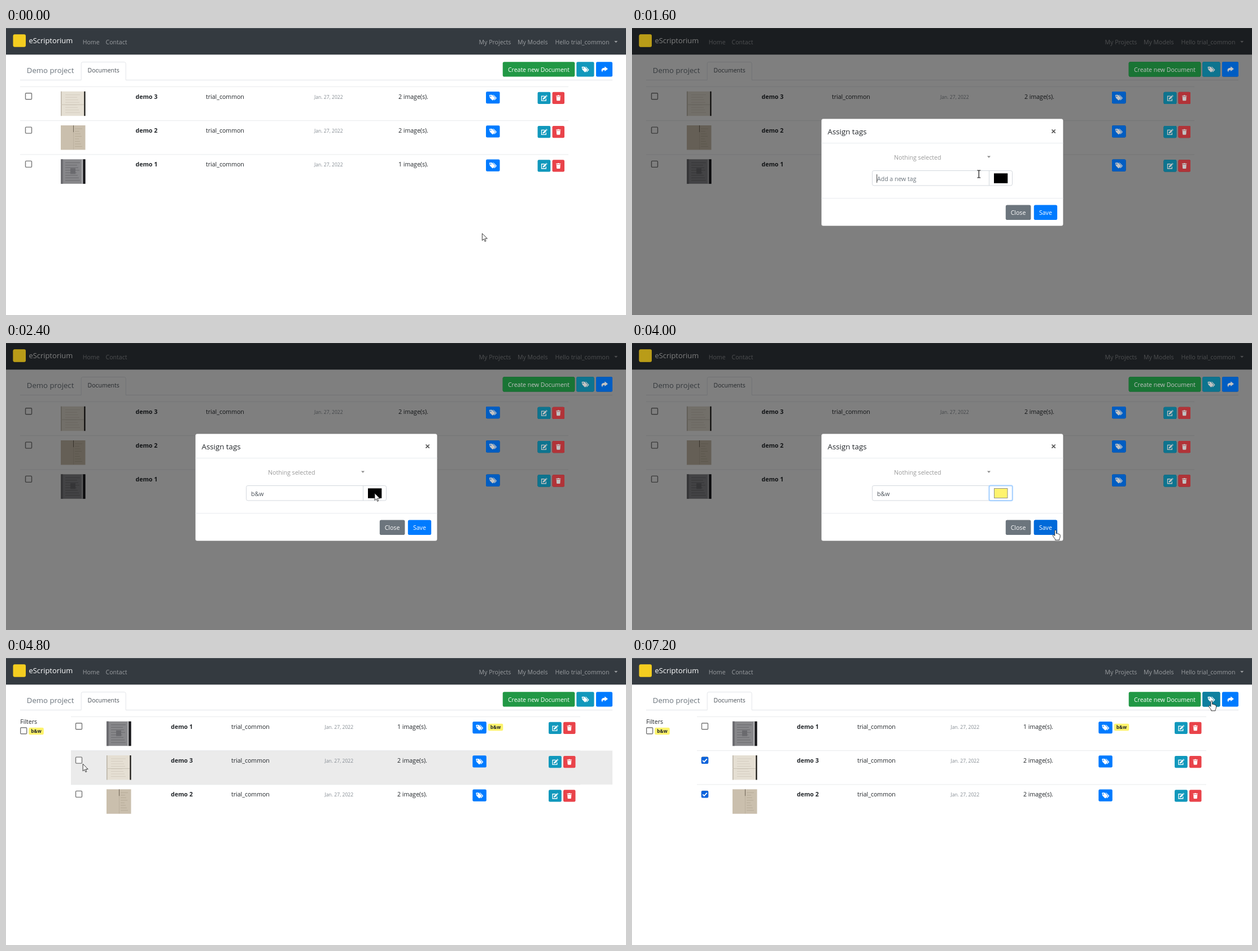
An HTML page that plays this animation: 1098x510 px, repeating every 8 s.

```html
<!DOCTYPE html>
<html lang="en">
<head>
<meta charset="utf-8">
<title>Tagging documents</title>
<style>
html, body { margin: 0; width: 100%; height: 100%; overflow: hidden; background: #fff; }
svg { display: block; width: 1098px; height: 510px; }
text { font: 10.55px "Open Sans", "Noto Sans", sans-serif; white-space: pre; }
.bold { font-weight: 700; }
.dialog text { font: 9px "Liberation Sans", Arial, sans-serif; }
.dialog .caption { font: 9.7px "Open Sans", sans-serif; }
.dimmed { filter: brightness(.76); }
.layer { animation: 8s step-end infinite; }
</style>
</head>
<body>
<svg id="stage" viewBox="0 0 1098 510" xmlns="http://www.w3.org/2000/svg">
  <defs>
    <linearGradient id="hue">
      <stop offset="0" stop-color="#f20"/>
      <stop offset=".17" stop-color="#fe0"/>
      <stop offset=".34" stop-color="#0d1"/>
      <stop offset=".5" stop-color="#0de"/>
      <stop offset=".67" stop-color="#01f"/>
      <stop offset=".83" stop-color="#f1f"/>
      <stop offset="1" stop-color="#f12"/>
    </linearGradient>
    <linearGradient id="grey" x2="0" y2="1">
      <stop offset="0" stop-color="#808080" stop-opacity="0"/>
      <stop offset="1" stop-color="#808080" stop-opacity=".95"/>
    </linearGradient>
    <linearGradient id="lum" x2="0" y2="1">
      <stop offset="0" stop-color="#fff"/>
      <stop offset="1" stop-color="#000"/>
    </linearGradient>
    <filter id="shadow" x="-5%" y="-5%" width="112%" height="112%">
      <feDropShadow dx="2" dy="3" stdDeviation="3" flood-opacity=".45"/>
    </filter>
    <g id="tags" fill="#fff">
      <path fill-rule="evenodd" d="M-6.3-3.8a1 1 0 0 1 1-1h3.9l5 5a1 1 0 0 1 0 1.4l-3.3 3.2a1 1 0 0 1-1.4 0l-4.2-4.2zM-4.8-2.3a1 1 0 1 0 2 0a1 1 0 1 0-2 0z"/>
      <path d="M0-4.8h1.2l5 5a1 1 0 0 1 0 1.4L2.7 5 1.8 4.2 5 .9z"/>
    </g>
    <path id="share" fill="#fff" d="M.8-5.2 6.4-.8.8 3.6V1.2C-2.6 1.2-3.6 2.4-3 5-5.6 3-6.6-2.6.8-2.8z"/>
    <g id="edit">
      <path d="M.8-3.2h-5.2v8h7.8V1.2" fill="none" stroke="#fff" stroke-width="1.3"/>
      <path d="M-2 .5 2.6-4.1l2 2L0 2.5l-2.3.4zM3.2-4.7l.8-.6 2 2-.7.7z" fill="#fff"/>
    </g>
    <path id="trash" fill="#fff" d="M-4.2-4.2h2.4l.6-.8h2.4l.6.8h2.4v1.3h-8.4zM-3.6-2.2h7.2l-.5 6.4q-.1.8-.9.8h-4.4q-.8 0-.9-.8z"/>
    <path id="arrow" d="M0 0V12.6L2.9 9.9 4.8 14.4 6.7 13.5 4.8 9.2H9z" fill="#fff" stroke="#222" stroke-width=".9"/>
    <path id="hand" d="M-1.3 1.2Q-1.3 0 0 0T1.3 1.2V6.2Q3.4 5.3 3.9 6.9 5.8 6.2 6.2 7.7 8.2 7.3 8.2 9.2V12Q8.2 14 6.8 15.6V17.8H-.6V16Q-2.4 14-4.6 10.5-5.2 8.8-3.6 8.6-2.4 8.9-1.3 10.4z" fill="#fff" stroke="#222" stroke-width=".9"/>
    <path id="beam" d="M-3-6.5H-.7Q0-6.5 0-5.6 0-6.5.7-6.5H3M0-6V6M-3 6.5H-.7Q0 6.5 0 5.6 0 6.5.7 6.5H3" fill="none" stroke="#111" stroke-width="1.2"/>
  </defs>
</svg>
<script>
const USER = "trial_common";
const rules = [];

const rect = (x, y, w, h, fill, more = "") =>
  `<rect x="${x}" y="${y}" width="${w}" height="${h}" fill="${fill}" ${more}/>`;
const text = (x, y, str, fill = "#212529", size = 0, more = "") =>
  `<text x="${x}" y="${y}" fill="${fill}" ${size ? `style="font-size:${size}px"` : ""} ${more}>${str}</text>`;
const use = (id, x, y) => `<use href="#${id}" x="${x}" y="${y}"/>`;
const line = (d, color, width = 1) =>
  `<path d="${d}" fill="none" stroke="${color}" stroke-width="${width}"/>`;
const icon = (id, x, y, w, h, fill) =>
  rect(x, y, w, h, fill, 'rx="2.3"') + use(id, x + w / 2, y + h / 2);
const middle = 'text-anchor="middle"';

// Shows content from step a up to step b; one step is a tenth of the loop.
function layer(a, b, content) {
  const name = `show${a}to${b}`;
  const rule = `@keyframes ${name} {
    0% { opacity: ${a ? 0 : 1} } ${a ? `${a * 10}% { opacity: 1 }` : ""}
    ${b * 10}% { opacity: ${b < 10 ? 0 : 1} } ${b < 10 ? "100% { opacity: 0 }" : ""} }`;
  if (!rules.includes(rule)) rules.push(rule);
  return `<g class="layer" style="animation-name:${name}">${content}</g>`;
}

const checkbox = (x, y) =>
  rect(x - 5.5, y - 5.5, 11, 11, "#fff", 'rx="1.3" stroke="#767676" stroke-width="1.4"');
const checked = (x, y) =>
  rect(x - 6.2, y - 6.2, 12.4, 12.4, "#0a63dc", 'rx="2"') +
  line(`M${x - 3.8} ${y + .2}l2.6 2.6 5-5.4`, "#fff", 1.8);
const badge = (x, y) =>
  rect(x, y, 26.5, 12.5, "#fdf36c", 'rx="2.3"') +
  text(x + 13.2, y + 9.2, "b&amp;w", "#212529", 8.2, `class="bold" ${middle}`);

// Small page scans, suggested with flat tones and faint writing.
function thumb(kind, x, y) {
  const [paper, ink] = { 1: ["#87878a", "#626266"], 2: ["#cabfad", "#b3a794"], 3: ["#e5dfd3", "#d0c8ba"] }[kind];
  let out = rect(x, y, 43.5, 43.5, paper);
  const left = kind === 2 ? 25 : 8;
  for (let i = 0; i < 8; i++)
    out += line(`M${x + left} ${y + 6 + i * 4.5}h${(kind === 2 ? 13 : 26) - i * 5 % 7}`, ink, .8);
  if (kind === 1) {
    out += rect(x, y, 4, 43.5, "#6c6c70") + rect(x + 17, y + 16, 9, 10, "#6a6a6e") +
      rect(x + 37, y, 2, 43.5, "#b2b2b4") + rect(x + 39.5, y, 4, 43.5, "#17171a");
  } else if (kind === 2) {
    out += line(`M${x + 22.5} ${y}v12`, "#6d6355", 1) + line(`M${x + 22.5} ${y + 12}v31`, "#b9ae9c", .8);
  } else {
    out += rect(x, y, 1.5, 43.5, "#b9b2a5") + rect(x, y + 23, 41, 1, "#c9c2b4") +
      rect(x + 41.3, y, 2.2, 43.5, "#161513");
  }
  return out;
}

const listA = { left: 25, right: 996, box: 40, thumb: 97, name: 229.5, user: 354, date: 546, images: 695, tag: 850, edit: 941.5, order: [3, 2, 1] };
const listB = { left: 115, right: 1017, box: 129, thumb: 178, name: 292, user: 399, date: 564.5, images: 693, tag: 826.3, edit: 961, order: [1, 3, 2] };
const rowTop = i => 104.3 + i * 60.3;

const rows = c => c.order.map((n, i) => {
  const y = rowTop(i), base = y + 21.3;
  return line(`M${c.left} ${y}H${c.right}`, "#e6e8ea", .9) +
    checkbox(c.box, y + 17) + thumb(n, c.thumb, y + 8.4) +
    text(c.name, base, `demo ${n}`, "#212529", 10.6, 'class="bold"') +
    text(c.user, base, USER) +
    text(c.date, base, "Jan. 27, 2022", "#858c93", 8.6) +
    text(c.images, base, `${n === 1 ? 1 : 2} image(s).`);
}).join("");

const rowButtons = c => c.order.map((n, i) => {
  const y = rowTop(i);
  return icon("tags", c.tag, y + 8.6, 24.5, 21.3, "#007bff") +
    icon("edit", c.edit, y + 9.4, 22.8, 21.3, "#1198bc") +
    icon("trash", c.edit + 26, y + 9.4, 21.5, 21.3, "#e9434a");
}).join("");

const hover = (c, i) => rect(c.left, rowTop(i), 1074 - c.left, 60.3, "#ebebeb");

const logo = rect(12.5, 11.3, 22.5, 22.5, "#f4cd20", 'rx="3"');
const toolbar =
  rect(879.7, 60.3, 127.6, 26.3, "#219845", 'rx="2.8"') +
  text(943.5, 77.8, "Create new Document", "#fff", 10.5, middle) +
  icon("tags", 1010.3, 60.3, 31.2, 26.3, "#1198bc") +
  icon("share", 1045, 60.3, 29, 26.3, "#007bff");

const navGrey = "#9a9da0";
const page =
  rect(0, 0, 1098, 510, "#fff") + rect(0, 0, 1098, 47.3, "#343a40") + rect(0, 0, 1098, .8, "#5d6267") +
  logo + text(40.5, 27.3, "eScriptorium", "#fff", 12.9) +
  text(135.7, 28.6, "Home", navGrey) + text(176.6, 28.6, "Contact", navGrey) +
  text(837.6, 28.6, "My Projects", navGrey) + text(906, 28.6, "My Models", navGrey) +
  text(972.5, 28.6, `Hello ${USER}`, navGrey) +
  `<path d="M1077.2 23h6l-3 3.2z" fill="${navGrey}"/>` +
  text(36.8, 80.2, "Demo project", "#6c757d", 13.2) +
  line("M25 92.5H133.2V63.5Q133.2 60.5 136.2 60.5H209.2Q212.2 60.5 212.2 63.5V92.5H1074", "#dfe3e7", .9) +
  text(144.5, 79.2, "Documents", "#495057", 10.5) + toolbar;

const filters = text(25.3, 117, "Filters") + checkbox(31.2, 129.2) + badge(40.3, 123.8);

const cross = (x, y, r, color, width) =>
  line(`M${x - r} ${y - r}l${2 * r} ${2 * r}M${x + r} ${y - r}l${-2 * r} ${2 * r}`, color, width);

const modal =
  rect(0, 0, 1098, 510, "#000", 'opacity=".5"') +
  `<g class="dimmed">${logo}${toolbar}${rowButtons(listA)}</g>` +
  rect(335.3, 161.3, 428.4, 190.4, "#fff", 'rx="3.5" stroke="#000" stroke-opacity=".25" stroke-width=".7"') +
  line("M335.5 204.6H763.5M335.5 302.6H763.5", "#e6e9ec", .9) +
  text(346.5, 188.6, "Assign tags", "#212529", 13.3) +
  cross(746.6, 183.6, 3.1, "#555", 1.7) +
  text(464, 233.8, "Nothing selected", "#999", 10.65) +
  `<path d="M629 227.6h6l-3 3.2z" fill="#888"/>` +
  rect(425.5, 253.5, 248, 26.5, "#fff", 'rx="2.8" stroke="#ced4da" stroke-width=".9"') +
  line("M632.5 253.5v26.5", "#ced4da", .9) +
  rect(641, 258.3, 24.3, 17.5, "#000") +
  rect(661.8, 314.6, 44.6, 26.4, "#6c757d", 'rx="2.8"') + text(684, 332, "Close", "#fff", 0, middle) +
  rect(711.8, 314.6, 41.3, 26.4, "#007bff", 'rx="2.8"') + text(732.4, 332, "Save", "#fff", 0, middle);

const emptyInput = text(434, 271.7, "Add a new tag", "#6c757d") + line("M433.7 260v15", "#222", .9);
const typedInput = text(434, 271.7, "b&amp;w", "#495057");
const pickedColor =
  rect(632.5, 253.3, 41.3, 26.9, "#fff", 'rx="2.5" stroke="#a9d2ff" stroke-width="2.2"') +
  rect(641.4, 258.6, 23.6, 16.8, "#fff36e", 'stroke="#777" stroke-width=".8"');
const saveHover = rect(711.8, 314.6, 41.3, 26.4, "#0069d9", 'rx="2.8"') +
  text(732.4, 332, "Save", "#fff", 0, middle);

const palette = `ea8e86 fbf07a 7ae678 0ad07a 7af2fa 007aff ff8cbe ff92fb
  ff1a00 fff200 86e000 0cd838 00e6ff 0078c8 8088b4 f828f8
  8a5048 f8941c 00d800 0a6e78 0a4684 828cf8 8c1448 ff2878
  8c1414 ff8c00 006c00 0a7040 0014ff 000aa8 8c148c 8c14ff
  501414 8c4600 003200 0a4650 00008c 00004a 4a0a4a 460a8c
  000000 827800 827a46 828282 3c7882 bec4c8 4a0a4a ffffff`.trim().split(/\s+/);

function well(col, row, top, fill) {
  const x = 235.4 + col * 22.33, y = top + row * 19.5;
  return rect(x, y, 17.2, 15, fill) +
    line(`M${x} ${y + 15}V${y}H${x + 17.2}`, "#808080", 1) +
    line(`M${x} ${y + 15}H${x + 17.2}V${y}`, "#fff", 1);
}

const field = (label, end, row, value) => {
  const y = 348.2 + row * 20;
  return text(end, y + 11.4, label, "#000", 0, 'text-anchor="end"') +
    rect(end + 3.3, y, 22.6, 16.6, "#fff", 'stroke="#7a7a7a" stroke-width=".9"') +
    text(end + 5.4, y + 11, value, "#000");
};
const pushButton = (x, y, w, label, fill = "#e1e1e1", edge = "#adadad", ink = "#000", weight = .9) =>
  rect(x, y, w, 18, fill, `stroke="${edge}" stroke-width="${weight}"`) +
  text(x + w / 2, y + 12.2, label, ink, 0, middle);

const dialog = `<g class="dialog">` +
  rect(227.3, 145, 385.4, 289, "#f0f0f0", 'filter="url(#shadow)"') +
  rect(227.3, 145, 385.4, 25.3, "#484746") +
  text(233.8, 161.4, "Couleurs", "#fff", 0, 'class="caption"') + cross(598, 157.3, 4.2, "#fff", .9) +
  text(232.7, 185.2, "Couleurs de base :", "#000") +
  palette.map((c, i) => well(i % 8, i >> 3, 192.3, "#" + c)).join("") +
  rect(234, 288.6, 19.8, 17.6, "none", 'stroke="#777" stroke-width="1.2"') +
  text(232.7, 331.2, "Couleurs personnalisées :", "#000") +
  Array.from({ length: 16 }, (_, i) => well(i % 8, i >> 3, 338.7, "#000")).join("") +
  pushButton(233.3, 386, 177, "Définir les couleurs personnalisées &gt;&gt;", "#ccc", "#bfbfbf", "#8f8f8f") +
  pushButton(233.8, 409.2, 54.4, "OK", "#e1e1e1", "#0078d7", "#000", 1.6) +
  pushButton(295, 409, 55.7, "Annuler") +
  pushButton(424, 409, 182.3, "Ajouter aux couleurs personnalisées") +
  rect(423.7, 176.5, 151.8, 165.3, "url(#hue)") + rect(423.7, 176.5, 151.8, 165.3, "url(#grey)") +
  line("M525 335.5v3M519.5 340.5h4M526.5 340.5h4", "#000", 2) +
  rect(588.8, 176.5, 9.6, 165.3, "url(#lum)", 'stroke="#999" stroke-width=".6"') +
  `<path d="M599.5 341.3 612.5 328.5V354z"/>` +
  rect(423.7, 348, 51.3, 36.7, "#000") + text(420.8, 395.8, "Couleur|Unie", "#000") +
  field("Teinte :", 506.8, 0, 160) + field("Satur. :", 506.8, 1, 0) + field("Lum. :", 506.8, 2, 0) +
  field("Rouge :", 571, 0, 0) + field("Vert :", 571, 1, 0) + field("Bleu :", 571, 2, 0) + `</g>`;

const rowMid = i => rowTop(i) + 17.3;

document.getElementById("stage").insertAdjacentHTML("beforeend",
  page +
  layer(1, 2, hover(listA, 2)) +
  layer(0, 6, rows(listA) + rowButtons(listA)) +
  layer(1, 2, icon("tags", 850, rowTop(2) + 8.6, 24.5, 21.3, "#0069d9")) +
  layer(6, 8, hover(listB, 1)) +
  layer(8, 9, hover(listB, 2)) +
  layer(6, 10, filters + rows(listB) + rowButtons(listB) + badge(853.8, 116.7)) +
  layer(7, 10, checked(129, rowMid(1))) +
  layer(8, 10, checked(129, rowMid(2))) +
  layer(9, 10, icon("tags", 1010.3, 60.3, 31.2, 26.3, "#0d7f9f")) +
  layer(2, 6, modal) +
  layer(2, 3, emptyInput) +
  layer(3, 6, typedInput) +
  layer(4, 5, dialog) +
  layer(5, 6, pickedColor + saveHover) +
  layer(0, 1, use("arrow", 843.3, 365)) +
  layer(1, 2, use("hand", 857, 240.8)) +
  layer(2, 3, use("beam", 614.3, 259.5)) +
  layer(3, 4, use("arrow", 653, 267)) +
  layer(4, 5, use("arrow", 266, 224)) +
  layer(5, 6, use("hand", 750, 332.3)) +
  layer(6, 7, use("arrow", 136.2, 188.3)) +
  layer(7, 8, use("arrow", 131, 184)) +
  layer(8, 9, use("arrow", 131, 244)) +
  layer(9, 10, use("hand", 1026.3, 76)));

const style = document.createElement("style");
style.textContent = rules.join("\n");
document.head.append(style);
</script>
</body>
</html>
```
